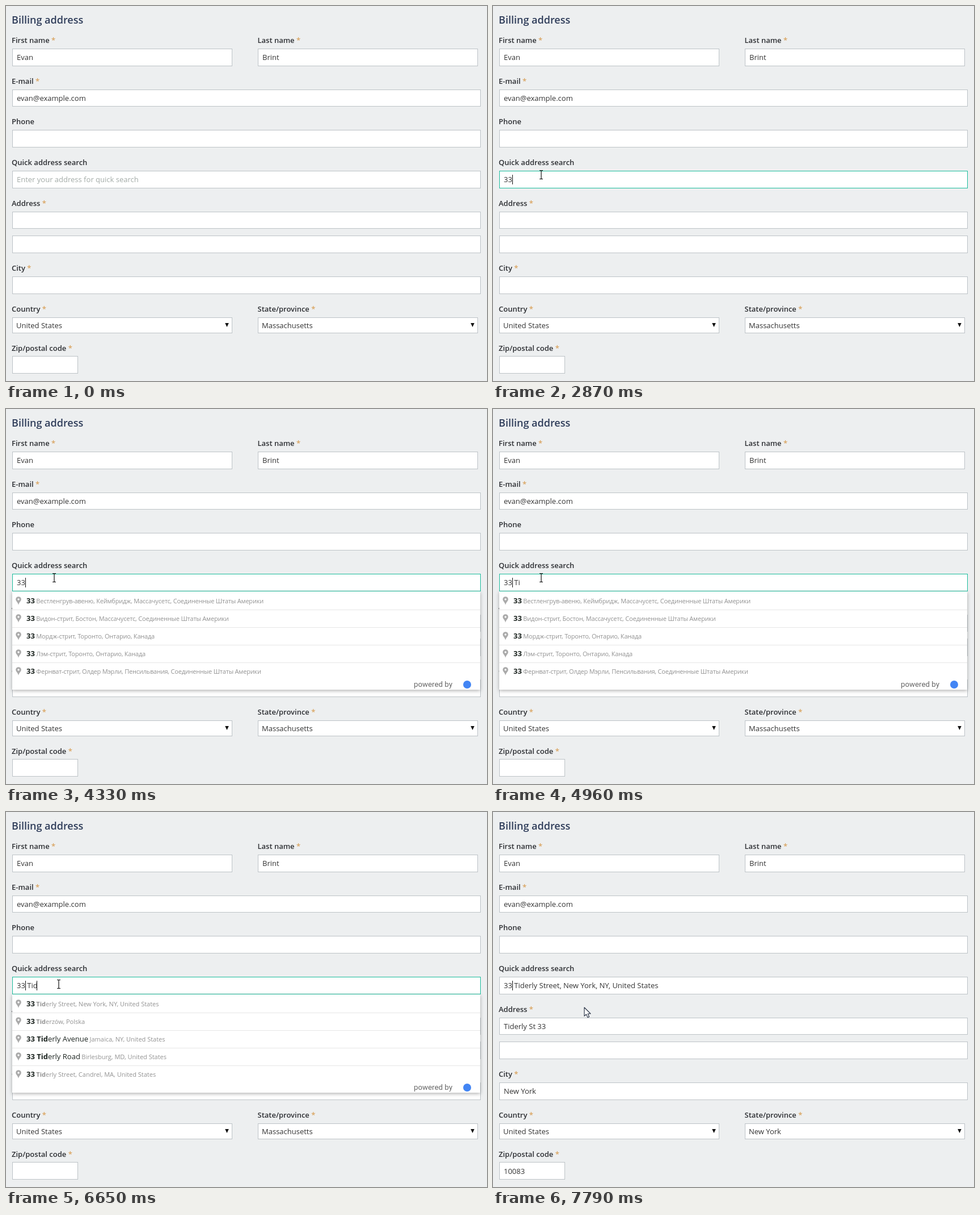
Write an HTML page that moves like this. It is 848 by 660 pixels and loops after 8 s.

```html
<!DOCTYPE html>
<html lang="en">
<head>
<meta charset="utf-8">
<title>Billing address</title>
<style>
  html, body { margin: 0; width: 100%; height: 100%; overflow: hidden; background: #edeff0; }
  svg { display: block; width: 848px; height: 660px; }
  text { font: 13px "Open Sans", sans-serif; fill: #333; white-space: pre; }
  .title { font-size: 18px; font-weight: 600; fill: #2f3d5a; }
  .label { font-weight: 600; fill: #2d2f33; }
  .star { font-weight: 600; fill: #d9a25c; }
  .hint { fill: #a3aba7; }
  .sub { font-size: 11px; fill: #939393; }
  .cyrillic .sub { letter-spacing: -.2px; }
  .bold { font-weight: 700; }
  .main { fill: #1c2420; }
  .powered { font: 13.3px Roboto, sans-serif; fill: #666; }
  .field { fill: #fff; stroke: #bdc3c7; }
  .focus { stroke: #1abc9c; }
  .list { fill: #fff; filter: drop-shadow(0 2px 3px rgba(0, 0, 0, .3)); }
</style>
</head>
<body>
<svg id="stage" viewBox="0 0 848 660"></svg>
<script>
const LOOP = 8000;
const LIST_TOP = 321, ROW = 31;
const stage = document.getElementById('stage');

// x, y, width, height of the text inputs
const inputs = {
  first: [11, 75, 388, 31], last: [444, 75, 388, 31], email: [11, 147, 826, 30],
  phone: [11, 218, 826, 31], search: [11, 290, 826, 31], line1: [11, 362, 826, 30],
  line2: [11, 404, 826, 31], city: [11, 476, 826, 31], zip: [11, 616, 116, 31]
};
const selects = { country: [11, 548, 388, 28], state: [444, 548, 388, 28] };

// Rows: main text | secondary text, with matches between asterisks
const lists = [
  { from: 3190, script: 'cyrillic', rows: [
    '*33*048|Dunmers Highway, Talmungree, Южная Австралия, Австралия',
    '*33*6|Рут 6, Элмвик, Коннектикут, Соединенные Штаты Америки',
    '*33*9|Рут 6, Дорвелл, Коннектикут, Соединенные Штаты Америки',
    '*33*8|Рут 6, Восток Тренмор, Род-Айленд, Соединенные Штаты Америки',
    '*33*72|Рут 6, Эшлин, Род-Айленд, Соединенные Штаты Америки'] },
  { from: 4330, script: 'cyrillic', rows: [
    '*33*|Вестленгрув-авеню, Кеймбридж, Массачусетс, Соединенные Штаты Америки',
    '*33*|Видон-стрит, Бостон, Массачусетс, Соединенные Штаты Америки',
    '*33*|Мордж-стрит, Торонто, Онтарио, Канада',
    '*33*|Лэм-стрит, Торонто, Онтарио, Канада',
    '*33*|Фернват-стрит, Олдер Мэрли, Пенсильвания, Соединенные Штаты Америки'] },
  { from: 5120, script: 'cyrillic', rows: [
    '*33*|Тиллмонт-стрит, Бостон, Массачусетс, Соединенные Штаты Америки',
    '*33*|Тимлен-стрит, Торонто, Онтарио, Канада',
    '*33*|Тирвуд-авеню, Бостон, Массачусетс, Соединенные Штаты',
    '*33*|Тидмор-стрит, Торонто, Онтарио, Канада',
    '*33*|Тилбрам-стрит, Бостон, Массачусетс, Соединенные Штаты'] },
  { from: 5520, script: 'latin', rows: [
    '*33*|*Tid*erly Street, New York, NY, United States',
    '*33*|*Tid*erzów, Polska',
    '*33 Tid*erly Avenue|Jamaica, NY, United States',
    '*33 Tid*erly Road|Birlesburg, MD, United States',
    '*33*|*Tid*erly Street, Candrel, MA, United States'] }
];

const typed = [
  [0, ''], [2870, '33'], [4560, '33 T'], [4960, '33 Ti'], [5040, '33 Tid'],
  [7650, '33 Tiderly Street, New York, NY, United States']
];

// Pointer: each leg is sampled in equal steps from start to end
const legs = [
  { start: 70, end: 670, steps: 8, a: [642, 559], b: [85, 296], power: 1.5 },
  { start: 1780, end: 1780, steps: 1, a: [85, 296], b: [85, 297], power: 1 },
  { start: 6550, end: 6980, steps: 4, a: [93, 303], b: [163, 350], power: 1.3 },
  { start: 7140, end: 7340, steps: 2, a: [163, 349], b: [161, 344], power: 1 }
];

const text = (x, y, body, cls = '', id = '') =>
  `<text x="${x}" y="${y}" class="${cls}" id="${id}">${body}</text>`;
const box = (id, [x, y, w, h]) =>
  `<rect class="field" id="${id}" x="${x + .5}" y="${y + .5}" width="${w - 1}" height="${h - 1}"/>`;
const label = (x, y, name, required = true) =>
  text(x, y, name + (required ? '<tspan class="star"> *</tspan>' : ''), 'label');
const triangle = x => `<path d="M${x} 558h6.6l-3.3 7z" fill="#111"/>`;
const caret = (id, x) => `<rect id="${id}" x="${x}" y="297" width="1" height="17" fill="#111"/>`;

function spans(source, cls, dx) {
  return source.split('*').map((part, i) => ({ part, bold: i % 2 }))
    .filter(s => s.part)
    .map((s, i) => `<tspan class="${cls}${s.bold ? ' bold' : ''}" dx="${i ? 0 : dx}">${s.part}</tspan>`)
    .join('');
}

function row(source, i) {
  const [main, sub] = source.split('|');
  return text(36, 342 + i * ROW, spans(main, 'main', 0) + spans(sub, 'sub', 2.5));
}

function pin(i) {
  return `<path transform="translate(22 ${335 + i * ROW})" fill="#aaa" fill-rule="evenodd"
    d="M0 10C-1 5-4.8 3-4.8 0A4.8 4.8 0 0 1 4.8 0C4.8 3 1 5 0 10ZM-1.7 0a1.7 1.7 0 0 0 3.4 0a1.7 1.7 0 0 0-3.4 0Z"/>`;
}

const separator = i => `<path d="M11 ${353.5 + i * ROW}h825" stroke="#e6e6e6"/>`;
const each = (n, draw) => Array.from({ length: n }, (_, i) => draw(i)).join('');

stage.innerHTML =
  '<rect width="848" height="660" fill="#edeff0"/>' +
  text(10, 31, 'Billing address', 'title') +
  label(10, 65, 'First name') + label(443.5, 65, 'Last name') +
  label(10, 137, 'E-mail') + label(10, 208, 'Phone', false) +
  label(10, 280, 'Quick address search', false) + label(10, 352, 'Address') +
  label(10, 466, 'City') + label(10, 538, 'Country') +
  label(443.5, 538, 'State/province') + label(10, 607, 'Zip/postal code') +
  Object.entries({ ...inputs, ...selects }).map(([id, r]) => box(id, r)).join('') +
  text(19, 95, 'Evan') + text(452, 95, 'Brint') + text(19, 167, 'evan@example.com') +
  text(18, 567, 'United States') + text(451, 567, '', '', 'stateText') +
  triangle(386.2) + triangle(819.2) +
  text(19, 310, 'Enter your address for quick search', 'hint', 'hint') +
  text(19, 310, '', '', 'query') +
  `<g id="filled">${text(19, 382, 'Tiderly St 33')}${text(19, 496, 'New York')}${text(19, 637, '10083')}</g>` +
  caret('caretStart', 19) + caret('caretMid', 34) + caret('caretEnd', 54) +
  `<g id="dropdown"><rect class="list" x="11" y="${LIST_TOP}" width="825" height="173"/>
    <rect id="hover" x="11" y="322" width="825" height="31" fill="#fafafa"/>` +
  each(4, separator) +
  lists.map((l, n) => `<g id="list${n}" class="${l.script}">${l.rows.map(row).join('')}</g>`).join('') +
  `<g id="extras">${each(5, pin)}${text(719, 489, 'powered by', 'powered')}
    <circle cx="813" cy="485" r="7" fill="#4285f4"/></g></g>` +
  `<g id="beam"><path d="M-3-7.5h2.2L0-6.8.8-7.5H3M0-7V7M-3 7.5h2.2L0 6.8.8 7.5H3"
    fill="none" stroke="#111" stroke-width="1.2"/></g>` +
  `<g id="arrow"><path d="M0 0V15.2L3.5 12 6 17.6 8.6 16.5 6.2 11H11Z"
    fill="#fff" stroke="#222c40" stroke-width="1.1" stroke-linejoin="round"/></g>`;

const el = {};
stage.querySelectorAll('[id]').forEach(node => { if (node.id) el[node.id] = node; });
const show = (id, on) => { el[id].style.display = on ? '' : 'none'; };
const latest = (items, time, at) => items.filter(item => at(item) <= time).pop();

function pointerAt(time) {
  const leg = latest(legs, time, l => l.start);
  if (!leg) return null;
  const span = leg.end - leg.start;
  const step = span ? Math.floor((time - leg.start) / span * leg.steps + .001) : leg.steps;
  const p = 1 - (1 - Math.min(1, step / leg.steps)) ** leg.power;
  return leg.a.map((a, i) => Math.round(a + (leg.b[i] - a) * p));
}

function render(t) {
  const open = t >= 3190 && t < 7650;
  const filled = t >= 7790;
  const query = latest(typed, t, entry => entry[0])[1];
  if (el.query.textContent !== query) el.query.textContent = query;
  el.stateText.textContent = filled ? 'New York' : 'Massachusetts';
  el.search.classList.toggle('focus', t >= 1410 && t < 7650);
  show('hint', !query);
  show('filled', filled);
  show('caretStart', t >= 1220 && t < 1780);
  show('caretMid', t >= 2870);
  show('caretEnd', t >= 5040 && t < 7140);

  show('dropdown', open);
  show('extras', t >= 3320);
  const current = latest(lists, t, l => l.from);
  lists.forEach((l, n) => show('list' + n, l === current));

  const pointer = pointerAt(t);
  show('beam', false);
  show('arrow', false);
  show('hover', pointer && pointer[1] > LIST_TOP);
  if (!pointer) return;
  const [x, y] = pointer;
  const overInput = Object.values(inputs).some(([l, top, w, h]) =>
    x >= l && x < l + w && y >= top && y < top + h);
  const shape = overInput && !(t >= 3190 && y >= LIST_TOP) ? 'beam' : 'arrow';
  show(shape, true);
  el[shape].setAttribute('transform', `translate(${x} ${y})`);
}

const began = performance.now();
function tick() {
  render((performance.now() - began) % LOOP);
  requestAnimationFrame(tick);
}
tick();
</script>
</body>
</html>
```
